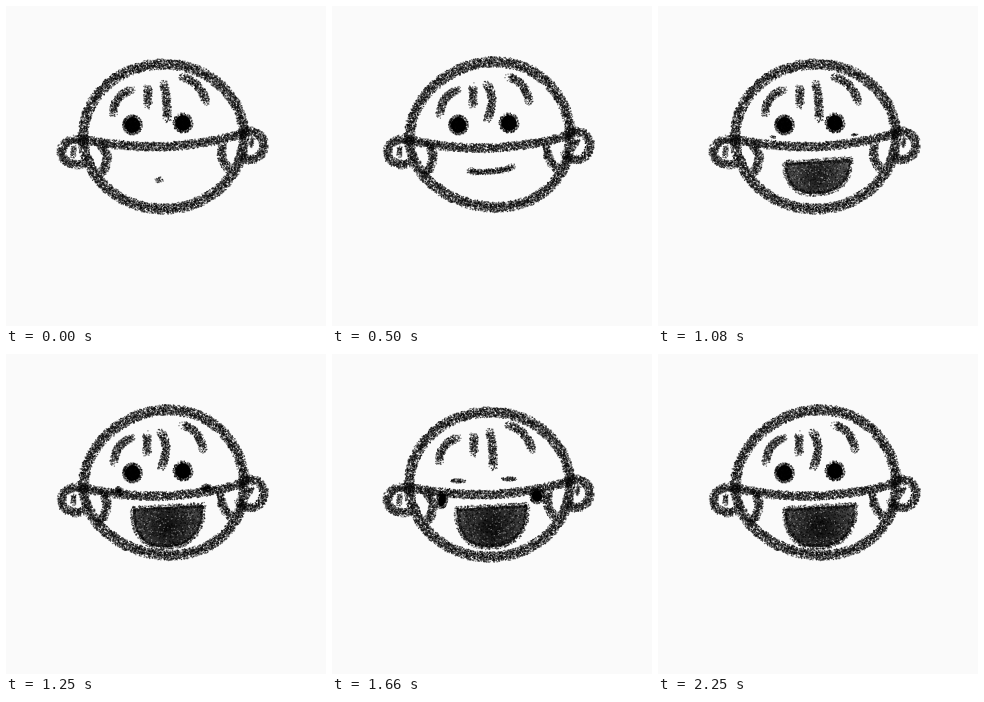
An HTML page with a canvas for the animation above (10000 ms loop, 320 by 320 pixels).

```html
<!DOCTYPE html>
<html lang="en">
<head>
<meta charset="utf-8">
<title>Laughing behind the mask</title>
<style>
  html, body { margin: 0; width: 100%; height: 100%; overflow: hidden; background: #fafafa; }
  canvas { display: block; width: 100vw; height: 100vh; }
</style>
</head>
<body>
<canvas id="stage" width="320" height="320"></canvas>
<script>
const SIZE = 320, LOOP = 10000, LAST_STEP = 27, RAD = Math.PI / 180;
const GRAIN = 'rgba(0,0,0,.55)';
const stage = document.getElementById('stage').getContext('2d');

const clamp = v => Math.max(0, Math.min(1, v));

function seeded(seed) {
  return () => {
    seed = (seed + 0x6D2B79F5) | 0;
    let v = Math.imul(seed ^ (seed >>> 15), 1 | seed);
    v = (v + Math.imul(v ^ (v >>> 7), 61 | v)) ^ v;
    return ((v ^ (v >>> 14)) >>> 0) / 4294967296;
  };
}

// Samples a curve given as a function of 0..1
function trace(curve, count = 40) {
  return Array.from({ length: count + 1 }, (_, i) => curve(i / count));
}

// Line from one point to another, bowed sideways in the middle
function bow(x0, y0, x1, y1, bend) {
  const length = Math.hypot(x1 - x0, y1 - y0);
  return trace(t => {
    const side = 4 * t * (1 - t) * bend / length;
    return [x0 + (x1 - x0) * t + (y1 - y0) * side, y0 + (y1 - y0) * t - (x1 - x0) * side];
  });
}

// Part of an ellipse, angles in degrees; shape(angle) scales the radius
function oval(cx, cy, rx, ry, from = 0, to = 360, shape = () => 1) {
  return trace(t => {
    const a = (from + (to - from) * t) * RAD, r = shape(a);
    return [cx + rx * r * Math.cos(a), cy + ry * r * Math.sin(a)];
  }, 90);
}

function dot(ctx, x, y, size) {
  ctx.fillRect(x - size / 2, y - size / 2, size, size);
}

// Grains scattered in a disc that travels along the path
function crayon(ctx, rand, points, width, density = 1.35) {
  ctx.fillStyle = GRAIN;
  let owed = 0;
  for (let i = 1; i < points.length; i++) {
    const [x0, y0] = points[i - 1], [x1, y1] = points[i];
    owed += Math.hypot(x1 - x0, y1 - y0) * width * density;
    for (; owed >= 1; owed--) {
      const t = rand(), angle = rand() * Math.PI * 2, r = Math.sqrt(rand()) * width / 2;
      dot(ctx, x0 + (x1 - x0) * t + Math.cos(angle) * r,
        y0 + (y1 - y0) * t + Math.sin(angle) * r, 1.2);
    }
  }
}

function blob(ctx, rand, cx, cy, rx, ry, tilt = 0) {
  if (rx < 0.5 || ry < 0.5) return;
  ctx.save();
  ctx.translate(cx, cy);
  ctx.rotate(tilt);
  ctx.fillStyle = '#050505';
  ctx.beginPath();
  ctx.ellipse(0, 0, Math.max(0.5, rx - 2.4), Math.max(0.5, ry - 2.4), 0, 0, Math.PI * 2);
  ctx.fill();
  ctx.fillStyle = GRAIN;
  for (let i = rx * ry * 5; i > 0; i--) {
    const angle = rand() * Math.PI * 2, r = Math.sqrt(rand());
    dot(ctx, Math.cos(angle) * r * rx, Math.sin(angle) * r * ry, 1.1);
  }
  ctx.restore();
}

// Two drawings of the same head; lean is 0 or 1
function renderHead(lean) {
  const layer = document.createElement('canvas');
  layer.width = layer.height = SIZE;
  const ctx = layer.getContext('2d'), rand = seeded(11 + lean);
  const draw = (width, ...paths) => paths.forEach(path => crayon(ctx, rand, path, width));
  const lopsided = a => 1 + lean *
    (0.028 * Math.cos(a + 40 * RAD) + 0.02 * Math.cos(3 * (a + 70 * RAD)));

  draw(11, oval(157.5, 130.5, 80.5, 72.5, 0, 360, lopsided));
  draw(9.5,
    bow(77, 133 + lean, 239 - lean, 127 + 2 * lean, -10.5),
    bow(94 + 3 * lean, 138, 94, 168, 7 - 2 * lean),
    bow(217 - 2 * lean, 138, 223 + 3 * lean, 163, -4),
    oval(70, 146, 14.5, 12.5, 55, 305),
    oval(244, 139.5, 14, 14, -125, 130 + 15 * lean));
  draw(5.5,
    bow(68, 141, 67, 150, 0),
    bow(247 - lean, 133, 245 - lean, 140, 0));
  draw(9,
    bow(107 + lean, 108, 125 + lean, 84, 5),
    bow(142 - lean, 81, 142 - lean, 99, 0),
    bow(158 - 3 * lean, 78, 161 - 6 * lean, 113, 1 + 4 * lean),
    bow(176 + lean, 71, 200 - 3 * lean, 96, 5));
  return layer;
}
const heads = [renderHead(0), renderHead(1)];
const leanAt = step => Math.floor(step / 2) % 2;

// The dot widens into a smile, then the smile drops open
function drawMouth(step) {
  const rand = seeded(100 + step);
  const grow = clamp(step / 6), open = clamp((step - 6) / 9) ** 0.85;
  const half = 2 + 20 * grow + 13 * open;
  const cx = 153 + 6 * grow + 3 * open - 2 * open * (1 - leanAt(step));
  const top = 174 - 12 * grow - 9 * open;
  const sag = 3.5 * grow * (1 - open), depth = sag + 40 * open;
  const place = (x, drop) => [cx + half * x, top - 2 * grow * x + drop];

  const upper = trace(t => place(2 * t - 1, sag * 4 * t * (1 - t)));
  const lower = trace(t => {
    const c = Math.cos(t * Math.PI);
    return place(Math.sign(c) * Math.abs(c) ** 0.85, depth * Math.sin(t * Math.PI) ** 0.8);
  });

  stage.save();
  stage.beginPath();
  [...upper, ...lower].forEach(([x, y]) => stage.lineTo(x, y));
  stage.clip();
  const shade = stage.createRadialGradient(cx, top + depth / 2, 4, cx, top + depth / 2, half);
  shade.addColorStop(0, `rgba(0,0,0,${0.6 + 0.32 * open})`);
  shade.addColorStop(1, `rgba(0,0,0,${0.5 + 0.2 * open})`);
  stage.fillStyle = shade;
  stage.fillRect(cx - half, top - 4, half * 2, depth + 8);
  for (let i = half * depth * 0.8; i > 0; i--) {
    stage.fillStyle = rand() < 0.65 + 0.15 * open ? GRAIN : 'rgba(250,250,250,.4)';
    dot(stage, cx + (rand() * 2 - 1) * half, top - 3 + rand() * (depth + 3), 1.1);
  }
  stage.restore();

  crayon(stage, rand, upper, 6, 0.75);
  crayon(stage, rand, lower, 6, 0.75);
}

// One slow blink around step 20
function drawEyes(step) {
  const rand = seeded(7), open = clamp((Math.abs(step - 20) - 1) / 3);
  const drop = 8 * (1 - open), rx = 8 + 2 * open, ry = 2.2 + 8 * open;
  blob(stage, rand, 126.5, 119 + drop, rx, ry);
  blob(stage, rand, 177, 117 + drop, rx, ry);
}

// Tears swell and roll outwards, then dry up
function drawTears(step) {
  const rand = seeded(23), swell = clamp((step - 12) / 6);
  const size = Math.min(swell, clamp((26 - step) / 3)), rx = 6 * size ** 0.4, ry = 9 * size;
  blob(stage, rand, 116 - 6 * swell, 128 + 18 * swell, rx, ry, 0.2);
  blob(stage, rand, 195 + 10 * swell, 126 + 16 * swell, rx * 1.25, ry * 0.9, -0.3);
}

function draw(step) {
  stage.fillStyle = '#fafafa';
  stage.fillRect(0, 0, SIZE, SIZE);
  stage.drawImage(heads[leanAt(step)], 0, 0);
  drawEyes(step);
  drawTears(step);
  drawMouth(step);
}

// Twelve steps a second, with step times cut to whole hundredths
function stepAt(ms) {
  const tick = Math.floor(ms / 10) * 10 + 9.99;
  return Math.min(LAST_STEP, Math.floor(tick * 12 / 1000));
}

const start = performance.now();
let shown = -1;
function frame() {
  const step = stepAt((performance.now() - start) % LOOP);
  if (step !== shown) draw(shown = step);
  requestAnimationFrame(frame);
}
frame();
</script>
</body>
</html>
```
